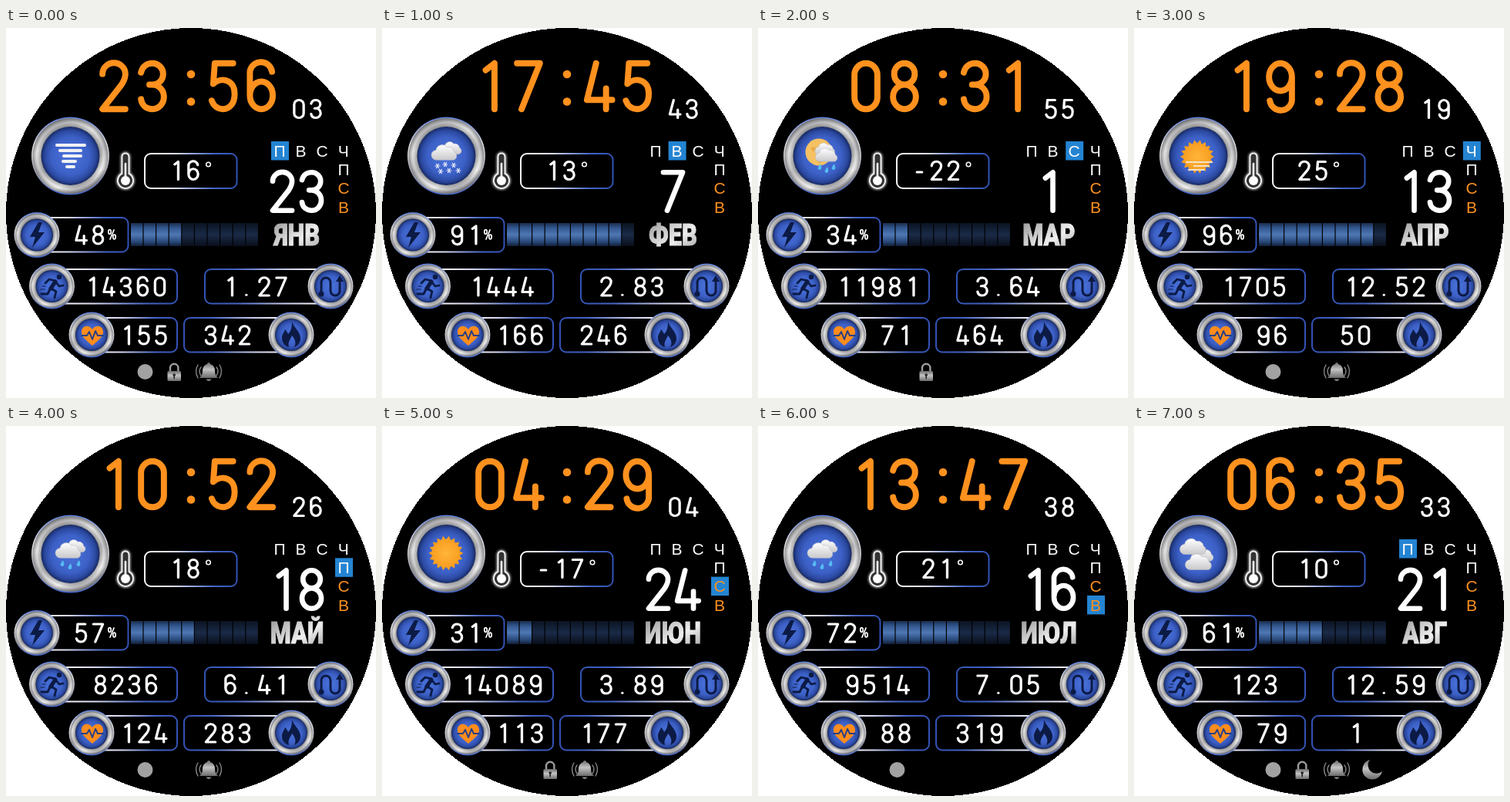
Animation of 480 by 480 pixels, one loop 8000 ms. Source, as an HTML page:

```html
<!DOCTYPE html>
<html lang="ru">
<head>
<meta charset="utf-8">
<title>Watch face</title>
<style>
html, body { margin: 0; width: 100%; height: 100%; overflow: hidden; background: #fff; }
svg { display: block; width: 480px; height: 480px; }
.num { fill: none; stroke: #fff; stroke-width: 8; stroke-linecap: round; stroke-linejoin: round; }
.time { stroke: #ff911e; }
.day { font: 21px "Liberation Sans", Arial, sans-serif; text-anchor: middle; }
.month { font: 900 39px Roboto, "Open Sans", sans-serif; text-anchor: middle; stroke-width: 1; }
.line { fill: none; stroke-linecap: round; stroke-linejoin: round; }
</style>
</head>
<body>
<svg viewBox="0 0 480 480">
  <defs>
    <linearGradient id="ring" x1=".3" y1="0" x2=".7" y2="1">
      <stop offset="0" stop-color="#a2a2a6"/><stop offset=".3" stop-color="#e6e6e6"/>
      <stop offset=".55" stop-color="#c4c4c6"/><stop offset=".8" stop-color="#f4f4f4"/>
      <stop offset="1" stop-color="#8a8a90"/>
    </linearGradient>
    <radialGradient id="bevel">
      <stop offset=".7" stop-color="#000" stop-opacity=".6"/>
      <stop offset=".8" stop-color="#000" stop-opacity=".2"/>
      <stop offset=".89" stop-color="#000" stop-opacity="0"/>
      <stop offset="1" stop-color="#000" stop-opacity=".35"/>
    </radialGradient>
    <linearGradient id="rim" x1="0" y1="0" x2="0" y2="1">
      <stop offset="0" stop-color="#5b7fe0"/><stop offset=".35" stop-color="#e4e4ea"/>
      <stop offset=".7" stop-color="#9a9aa6"/><stop offset="1" stop-color="#4266cf"/>
    </linearGradient>
    <radialGradient id="disc">
      <stop offset="0" stop-color="#4a73dc"/><stop offset=".65" stop-color="#3c60c6"/>
      <stop offset=".86" stop-color="#2c4aa2"/><stop offset="1" stop-color="#182a64"/>
    </radialGradient>
    <linearGradient id="toBlue">
      <stop offset="0" stop-color="#fff"/><stop offset=".35" stop-color="#d5d7ee"/>
      <stop offset=".75" stop-color="#4564c6"/><stop offset="1" stop-color="#3353b4"/>
    </linearGradient>
    <linearGradient id="toWhite">
      <stop offset="0" stop-color="#3353b4"/><stop offset=".25" stop-color="#4564c6"/>
      <stop offset=".65" stop-color="#c9cdea"/><stop offset="1" stop-color="#fff"/>
    </linearGradient>
    <linearGradient id="steel" x1="0" y1="0" x2="1" y2="1">
      <stop offset="0" stop-color="#8c8c8c"/><stop offset=".3" stop-color="#c2c2c2"/>
      <stop offset=".6" stop-color="#efefef"/><stop offset="1" stop-color="#9a9a9a"/>
    </linearGradient>
    <linearGradient id="dull" x1="0" y1="0" x2="0" y2="1">
      <stop offset="0" stop-color="#6c6c6c"/><stop offset=".45" stop-color="#c4c4c4"/>
      <stop offset="1" stop-color="#6a6a6a"/>
    </linearGradient>
    <linearGradient id="lit" x1="0" y1="0" x2="0" y2="1">
      <stop offset="0" stop-color="#1b2c4b"/><stop offset=".22" stop-color="#335890"/>
      <stop offset=".5" stop-color="#4f78b3"/><stop offset=".8" stop-color="#2a4a7c"/>
      <stop offset="1" stop-color="#121e35"/>
    </linearGradient>
    <linearGradient id="dim" x1="0" y1="0" x2="0" y2="1">
      <stop offset="0" stop-color="#0a1322"/><stop offset=".5" stop-color="#1a2a47"/>
      <stop offset="1" stop-color="#090f1b"/>
    </linearGradient>
    <linearGradient id="cloud" x1="0" y1="0" x2="0" y2="1">
      <stop offset="0" stop-color="#fff"/><stop offset="1" stop-color="#c9c9cc"/>
    </linearGradient>
    <radialGradient id="sun">
      <stop offset="0" stop-color="#ffb53a"/><stop offset="1" stop-color="#f79a1c"/>
    </radialGradient>
    <filter id="glow" x="-50%" y="-20%" width="200%" height="140%"><feGaussianBlur stdDeviation="1.6"/></filter>
  </defs>
  <circle cx="240" cy="240" r="240" shape-rendering="crispEdges"/>
  <g id="base"></g>
  <g id="live"></g>
</svg>
<script>
const STEP = 1000, NAVY = '#0c1a45', ORANGE = '#ff911e';
const SMALL = '.41 .385';

// Digit skeletons in a 30 x 60 cell centred on the origin
const GLYPH = {
  0: 'M-15-15a15 15 0 0 1 30 0V15a15 15 0 0 1-30 0Z',
  1: 'M-5.5-21L6-30V30',
  2: 'M-15-16a15 14.5 0 0 1 30 0c0 6-2 9-5 14L-15 30H15',
  3: 'M-15-18C-13-26-7-30 0-30A14 14 0 0 1 0-2H-4M0-2A15 16 0 0 1 0 30C-8 30-14 25-15 17',
  4: 'M-4-30L-16 18H17M9 3V30',
  5: 'M13-30H-11L-13-3C-4-12 15-10 15 10C15 24 7 30 0 30C-8 30-13 25-15 19',
  6: 'M14-19A14.5 14.5 0 0 0-15-15V12A15 18 0 0 0 15 12A15 18 0 0 0-15 12',
  7: 'M-15-30H15L-9 30',
  8: 'M0-2A13.5 14 0 0 1 0-30A13.5 14 0 0 1 0-2A15 16 0 0 1 0 30A15 16 0 0 1 0-2',
  9: 'M-14 19A14.5 14.5 0 0 0 15 15V-12A15 18 0 0 0-15-12A15 18 0 0 0 15-12',
  '.': 'M-3 28h.1',
  '-': 'M-8 5H8'
};

// [time, seconds, weather, temperature, weekday, date, month, battery, cells, steps, km, pulse, kcal, status]
const STATES = [
  ['2356', '03', 'wind', '16', 0, '23', 'ЯНВ', '48', 4, '14360', '1.27', '155', '342', 'bla'],
  ['1745', '43', 'snow', '13', 1, '7', 'ФЕВ', '91', 9, '1444', '2.83', '166', '246', ''],
  ['0831', '55', 'night', '-22', 2, '1', 'МАР', '34', 2, '11981', '3.64', '71', '464', 'l'],
  ['1928', '19', 'haze', '25', 3, '13', 'АПР', '96', 9, '1705', '12.52', '96', '50', 'ba'],
  ['1052', '26', 'rain', '18', 4, '18', 'МАЙ', '57', 5, '8236', '6.41', '124', '283', 'ba'],
  ['0429', '04', 'sun', '-17', 5, '24', 'ИЮН', '31', 2, '14089', '3.89', '113', '177', 'la'],
  ['1347', '38', 'rain', '21', 6, '16', 'ИЮЛ', '72', 6, '9514', '7.05', '88', '319', 'b'],
  ['0635', '33', 'cloud', '10', 0, '21', 'АВГ', '61', 5, '123', '12.59', '79', '1', 'blam']
];

const DAYS = [...'ПВСЧПСВ'].map((name, i) => ({
  name, x: i < 4 ? 355 + 27.6 * i : 438, y: i < 4 ? 159.5 : 159.5 + 24.3 * (i - 3)
}));

const $ = id => document.getElementById(id);
const path = (d, attrs = '') => `<path d="${d}" ${attrs}/>`;
const dot = (x, y, r, fill) => `<circle cx="${x}" cy="${y}" r="${r}" fill="${fill}"/>`;
const line = (d, color, width) => path(d, `class="line" stroke="${color}" stroke-width="${width}"`);
const at = (x, y, body, scale = 1) => `<g transform="translate(${x} ${y}) scale(${scale})">${body}</g>`;

// Digits centred on (x, y)
function num(text, x, y, scale = SMALL, pitch = 22, cls = '') {
  const left = x - pitch * (text.length - 1) / 2;
  return [...text].map((c, i) =>
    at(left + i * pitch, y, path(GLYPH[c], `class="num ${cls}"`), scale)).join('');
}

function frame(x, y, w, h, paint) {
  return `<rect x="${x}" y="${y}" width="${w}" height="${h}" rx="8" fill="#000" stroke="url(#${paint})" stroke-width="2"/>`;
}

function button(x, y, r, inner) {
  return dot(x, y, r, 'url(#rim)') + dot(x, y, r - 1.5, 'url(#ring)') +
    dot(x, y, r - 1.5, 'url(#bevel)') + dot(x, y, inner + 1, 'url(#disc)');
}

function cloud(x, y, s = 1) {
  const d = 'M-12 9a7 7 0 0 1-1-14a9 9 0 0 1 16-4a8 8 0 0 1 10 7a6 6 0 0 1-1 11Z';
  return at(x, y, path(d, 'fill="url(#cloud)" stroke="#b4b6bd" stroke-width=".6"'), s);
}

function sun(x, y, r) {
  const n = 36;
  const pts = Array.from({ length: n }, (_, i) => {
    const a = i * 2 * Math.PI / n, q = i % 2 ? r * .79 : r;
    return `${(x + q * Math.cos(a)).toFixed(1)},${(y + q * Math.sin(a)).toFixed(1)}`;
  });
  return `<polygon points="${pts.join(' ')}" fill="url(#sun)"/>`;
}

const flake = (x, y) => [0, 60, 120].map(a =>
  `<g transform="translate(${x} ${y}) rotate(${a})">${line('M-3 0h6', '#dfe6f8', 1.2)}</g>`).join('');
const drop = (x, y) => path(`M${x + 2} ${y - 4}q3 8-1 8q-5-1 1-8`, 'fill="#55bdf4"');
const pair = () => cloud(91, 157, .75) + cloud(82, 163, .92);

const WEATHER = {
  wind: () => [[66, 102, 152], [70, 97, 159], [75, 97, 166], [74, 90, 173], [79, 88, 180]]
    .map(([a, b, y]) => line(`M${a} ${y}H${b}`, '#f1f1f3', 4)).join(''),
  snow: () => pair() +
    [[72, 179], [82, 177], [93, 178], [76, 186], [87, 185], [99, 185]].map(p => flake(...p)).join(''),
  night: () => dot(79, 161, 17.5, '#f5c163') + dot(72, 157, 3, '#e8ae4c') + dot(80, 171, 4, '#e8ae4c') +
    cloud(88, 158, .72) + cloud(90, 166, .8) + drop(79, 180) + drop(88, 184) + drop(97, 180),
  haze: () => sun(82, 167, 22) + line('M68 174H101M78 179H97M71 184H91', '#f3e3cb', 2.2),
  sun: () => sun(83, 165, 22.5),
  rain: () => pair() + [[72, 178], [82, 182], [93, 178]].map(p => drop(...p)).join(''),
  cloud: () => cloud(90, 168, .8) + cloud(78, 158, .95) + cloud(85, 178, .95)
};

const STATUS = {
  b: dot(180.5, 446, 10, '#a2a2a2'),
  l: line('M213 446v-5a5.2 5.2 0 0 1 10.4 0v5', '#9c9c9c', 2.4) +
    '<rect x="209.5" y="445" width="17.5" height="13" rx="1.5" fill="url(#dull)"/>' +
    dot(218.2, 450, 1.8, '#222') + line('M218.2 451v3.5', '#222', 1.6),
  a: path('M263 434q2 0 2 2q6 2 6 9q0 6 4 9h-24q4-3 4-9q0-7 6-9q0-2 2-2Z', 'fill="url(#dull)"') +
    path('M259.500 455.500h7q-3.500 5-7 0Z', 'fill="#888"') +
    line('M253 440q-4 5 0 11M249 437q-5 8 0 17M273 440q4 5 0 11M277 437q5 8 0 17', '#858585', 1.4),
  m: path('M306 433a13 13 0 1 0 16 15a11 11 0 0 1-16-15Z', 'fill="url(#dull)"')
};

function drawBase() {
  const thermometer = 'M150.500 189V167a4.500 4.500 0 0 1 9 0V189a10 10 0 1 1-9 0Z';
  const colon = dot(240, 60, 5.3, ORANGE) + dot(240, 95.5, 5.3, ORANGE);
  const percent = '<g class="line" stroke="#fff" stroke-width="1.7"><ellipse cx="134.500" cy="264.500" rx="1.7" ry="2.8"/>' +
    '<ellipse cx="140.500" cy="271" rx="1.7" ry="2.8"/><path d="M140 262L135 274"/></g>';
  const bolt = path('M42 252L31 271H38L34 285L50 265H42L47 252Z', `fill="${NAVY}"`);
  const runner = dot(69, 323, 3.2, NAVY) +
    line('M64 329L58 338', NAVY, 5) +
    line('M64 328L56 326L51 331M65 330L69 335L74 334M59 338L65 342L63 350M57 339L54 345L46 345', NAVY, 2.8) +
    line('M47 335h4M45 339h5', NAVY, 1.2);
  const route = line('M409 342V330a6 6 0 0 1 12 0V341a6 6 0 0 0 12 0V328', NAVY, 3) +
    dot(409, 345, 3.5, NAVY) + path('M428 329L433 321L438 329Z', `fill="${NAVY}"`);
  const heart = path('M112 412C104 405 98 401 98 394C98 386 108 384 112 391C116 384 126 386 126 394C126 401 120 405 112 412Z', 'fill="#ff8c1c"') +
    line('M98 399H105L108 394L112 404L116 393L119 399H126', '#253f88', 2);
  const flame = path('M371 381C373 388 382 394 382 403C382 409 378 412 374 414C377 408 375 404 371 399C369 404 365 407 367 414C361 412 358 408 358 402C358 397 361 395 362 391C364 393 365 395 366 397C370 393 371 388 371 381Z', `fill="${NAVY}"`);

  $('base').innerHTML = colon +
    frame(180, 163, 119.500, 45, 'toBlue') + frame(40, 246, 118.500, 44.500, 'toBlue') +
    frame(60, 313, 162, 44.500, 'toBlue') + frame(258, 313, 162, 44.500, 'toWhite') +
    frame(110, 376, 112, 44.500, 'toBlue') + frame(231, 376, 139, 44.500, 'toWhite') +
    button(83.500, 166, 50.500, 37) + button(40, 268.500, 29.500, 20) + button(59.500, 335, 29.500, 20) +
    button(421, 335, 29.500, 20) + button(111, 398, 29.500, 20) + button(370, 398, 29.500, 20) +
    path(thermometer, 'fill="#aaa" stroke="#aaa" stroke-width="4" filter="url(#glow)"') +
    path(thermometer, 'fill="#333" stroke="#eee" stroke-width="2"') +
    dot(155, 198, 6, '#fff') + line('M155 197V176', '#fff', 2.6) +
    percent + bolt + runner + route + heart + flame;
}

function drawDays(active) {
  const { x, y } = DAYS[active];
  return `<rect x="${x - 11}" y="${y - 12.500}" width="23" height="24.500" fill="#2484d2"/>` +
    DAYS.map((d, i) => `<text class="day" x="${d.x}" y="${d.y + 7.300}" fill="${i > 4 ? ORANGE : '#fff'}">${d.name}</text>`).join('');
}

function drawBar(cells) {
  return Array.from({ length: 10 }, (_, i) => {
    const x = 162 + 16.6 * i;
    return `<rect x="${x}" y="253" width="15.4" height="30" fill="url(#${i < cells ? 'lit' : 'dim'})"/>`;
  }).join('');
}

function draw([time, sec, weather, temp, day, date, month, power, cells, steps, km, pulse, kcal, status]) {
  const cold = temp[0] === '-';
  const deg = cold ? 273 : 262.5;
  $('live').innerHTML =
    num(time.slice(0, 2), 165, 75.5, .99, 50, 'time') + num(time.slice(2), 306.5, 75.5, .99, 49.5, 'time') +
    num(sec, 391, 105) +
    WEATHER[weather]() +
    num(temp, cold ? 231.5 : 232, 185) +
    `<circle cx="${deg}" cy="177" r="2.8" fill="none" stroke="#fff" stroke-width="1.5"/>` +
    drawDays(day) + num(date, 377.5, 212, '.835 .825', 38) +
    at(377.5, 282, `<text class="month" fill="url(#steel)" stroke="url(#steel)">${month}</text>`, '.79 1') +
    num(power, 108.5, 268.5) + drawBar(cells) +
    num(steps, 155.5, 335.5) + num(km, km.length > 4 ? 325.5 : 324, 335.5) +
    num(pulse, 179, 398.5) + num(kcal, 287.5, 398.5) +
    [...status].map(s => STATUS[s]).join('');
}

const start = performance.now();
let shown = -1;

function tick() {
  const i = Math.floor((performance.now() - start) / STEP) % STATES.length;
  if (i !== shown) draw(STATES[shown = i]);
  requestAnimationFrame(tick);
}

drawBase();
tick();
</script>
</body>
</html>
```
